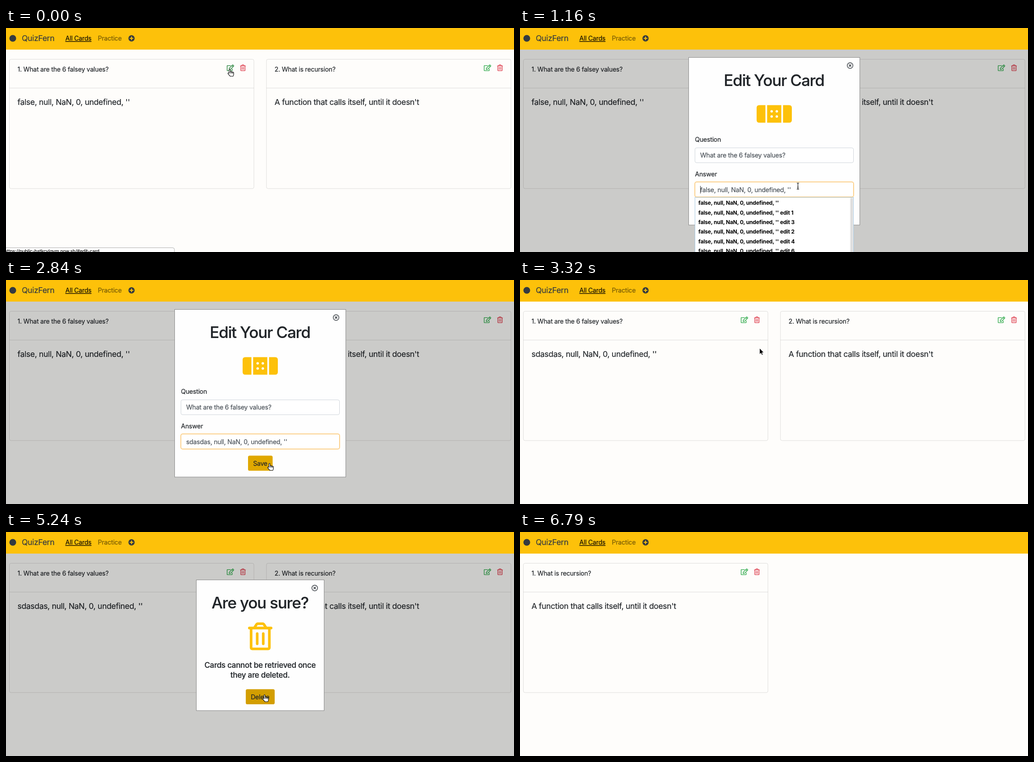
Animation, 1125 px wide and 498 px high, one loop 7080 ms. Source, as an HTML page:

```html
<!DOCTYPE html>
<html lang="en">
<head>
<meta charset="utf-8">
<title>Flash cards</title>
<style>
  html, body { margin: 0; width: 100%; height: 100%; overflow: hidden; background: #fefdfb; }
  svg { display: block; }
  text {
    font-family: Inter, "Open Sans", sans-serif;
    font-optical-sizing: none;
    letter-spacing: -.014em;
    color: #212529;
    fill: currentColor;
    stroke: currentColor;
    stroke-width: .2;
    white-space: pre;
  }
  .big { letter-spacing: -.018em; }
  .title { font-weight: 500; letter-spacing: -.0345em; }
  .note { font-weight: 500; letter-spacing: -.018em; }
  .bold { font-weight: 700; letter-spacing: -.013em; color: #000; stroke: none; }
  .mid { text-anchor: middle; }
  .line { fill: none; stroke: currentColor; }
</style>
</head>
<body>
<svg id="stage" width="1125" height="498" viewBox="0 0 1125 498"></svg>
<script>
const LOOP = 7080;
const GOLD = '#fdc10a', DARK = '#343a40';
const OLD = 'false', NEW = 'sdasdas', REST = ", null, NaN, 0, undefined, ''";
const RECURSION = ['What is recursion?', "A function that calls itself, until it doesn't"];

// Moments of the story, in ms
const EDIT = 180, FOCUS = 1100, TYPE = 1910, TYPED = 2600, SAVED = 2900, ASK = 4210, GONE = 5420;

// Pointer way points: time, x, y
const PATH = [
  [0, 495.5, 92], [450, 495.5, 92], [600, 520, 135], [800, 577, 262], [1000, 613, 345], [1050, 615.5, 351.5],
  [2630, 615.5, 351.5], [2720, 598, 385], [2810, 583.5, 408],
  [3110, 583.5, 408], [3215, 548, 262], [3320, 530.5, 152], [3420, 530, 108], [3530, 531.5, 88],
  [3860, 531.5, 88], [3940, 525, 91],
  [4410, 525, 91], [4560, 536, 160], [4720, 560, 296], [4880, 572.5, 362],
  [5690, 572.5, 362], [5780, 484, 345], [5860, 465, 295], [5940, 454, 228], [6020, 480, 227], [6080, 515, 234],
  [6350, 515, 234], [6405, 800, 345], [6460, 1092, 459],
  [6690, 1092, 459], [6730, 1116, 490], [6790, 1130, 500]
];

const text = (x, y, size, str, more = '') =>
  `<text x="${x}" y="${y}" font-size="${size}" ${more}>${str}</text>`;
const box = (x, y, w, h, fill, stroke = 'none', r = 3.6, more = '') =>
  `<rect x="${x}" y="${y}" width="${w}" height="${h}" rx="${r}" fill="${fill}" stroke="${stroke}" ${more}/>`;
const group = (id, body) => `<g id="${id}">${body}</g>`;
const at = (x, y, scale, color, id, body) =>
  `<g id="${id}" transform="translate(${x} ${y}) scale(${scale})" style="color:${color}">${body}</g>`;

const trash = (x, y, scale, color, id) => at(x, y, scale, color, id,
  `<path class="line" stroke-width="5.8" stroke-linecap="round" stroke-linejoin="round"
    d="M2.9 12.5H51.1M14.5 11L19 4.2Q20 2.9 21.5 2.9H32.5Q34 2.9 35 4.2L39.5 11
       M6.8 13V55.8Q6.8 58.8 9.8 58.8H44.2Q47.2 58.8 47.2 55.8V13M20.3 25V47.5M33.7 25V47.5"/>`);

const pencil = (x, y, id) => at(x, y, .0281, '#28a745', id,
  `<path class="line" stroke-width="48" stroke-linejoin="round"
    d="M318 88H48Q24 88 24 112V464Q24 488 48 488H400Q424 488 424 464V332
       M194 292L450 36Q467 20 483 36L541 94Q557 110 541 127L286 382L184 392ZM409 94L484 169"/>`);

const closer = (x, y) =>
  `<g transform="translate(${x} ${y})" style="color:${DARK}"><circle class="line" r="6.3" stroke-width="1.4"/>
   <path class="line" stroke-width="1.6" d="M-2.5-2.5L2.5 2.5M2.5-2.5L-2.5 2.5"/></g>`;

const card = (x, n) =>
  box(x + .5, 69.5, 541.5, 287.5, 'none', 'rgba(0,0,0,.125)') +
  `<path d="M${x + .5} 133.5H${x + 542}" stroke="rgba(0,0,0,.125)"/>` +
  text(x + 18.5, 96.7, 14, '', `id="q${n}"`) + text(x + 18.5, 171.3, 17.5, '', `id="a${n}" class="big"`) +
  pencil(x + 482, 81.2, 'edit' + n) + trash(x + 511.4, 81.2, .233, '#dc3545', 'trash' + n);

const bandage = () => {
  let s = `<path d="M543.5 171.5V210.5H530Q524 210.5 524 204.5V177.5Q524 171.5 530 171.5Z
                    M582.5 171.5H596Q602 171.5 602 177.5V204.5Q602 210.5 596 210.5H582.5Z" fill="${GOLD}"/>` +
    box(547.3, 171.5, 31.4, 39, GOLD, 'none', 0);
  for (const x of [557.3, 568.7]) for (const y of [185.3, 196.7])
    s += `<circle cx="${x}" cy="${y}" r="2.7" fill="#fff"/>`;
  return s;
};

const entries = ['', ' edit 1', ' edit 3', ' edit 2', ' edit 4', ' edit 6'];

document.getElementById('stage').innerHTML =
  box(0, 0, 1125, 498, '#fefdfb', 'none', 0) +
  card(7, 1) + group('second', card(576.3, 2)) +
  box(0, 48, 1125, 450, 'rgba(0,0,0,.2)', 'none', 0, 'id="shade"') +

  box(0, 0, 1125, 48, GOLD, 'none', 0) +
  `<circle cx="15" cy="23" r="7.5" fill="${DARK}"/>` +
  text(35, 29.3, 17.5, 'QuizFern', `class="big" style="color:${DARK}"`) +
  text(131.5, 28.3, 14, 'All Cards', 'style="color:rgba(0,0,0,.9)" text-decoration="underline"') +
  text(203.5, 28.3, 14, 'Practice', 'style="color:rgba(0,0,0,.5)"') +
  `<circle cx="278" cy="23" r="6.9" fill="${DARK}"/>
   <path d="M274 23H282M278 19V27" stroke="${GOLD}" stroke-width="2"/>` +

  group('editor',
    box(373.5, 65.5, 379, 372.5, '#fefefe', '#888', 0) + closer(731, 83.5) +
    text(562.5, 129.3, 35, 'Edit Your Card', 'class="title mid"') + bandage() +
    text(387.5, 253.4, 14, 'Question') + box(387.5, 266.5, 351, 33, '#fff', '#ced4da') +
    text(399, 288, 14, 'What are the 6 falsey values?', 'style="color:#495057"') +
    text(387.5, 330, 14, 'Answer') +
    box(386.8, 341.8, 352.4, 34.4, 'none', 'rgba(253,176,60,.3)', 4.4, 'id="glow" stroke-width="2"') +
    box(387.5, 342.5, 351, 33, '#fff', '#ced4da', 3.6, 'id="field"') +
    text(399, 364.5, 14, '', 'id="answer" style="color:#495057"') +
    box(399, 351, 1, 17, '#333', 'none', 0, 'id="caret"') +
    box(536, 390.5, 54.5, 33.5, GOLD, 'none', 3.6, 'id="save"') +
    text(563, 412.5, 14, 'Save', 'class="mid"') +
    group('list',
      box(387.5, 376.5, 351, 140, '#fff', '#a5c7e0', 0) +
      box(730.5, 377, 7.5, 130, '#f3f3f3', 'none', 0) + box(732, 378, 5, 130, '#dedede', 'none', 2) +
      entries.map((e, i) => text(395, 393.3 + i * 21.3, 12, OLD + REST + e, 'class="bold"')).join(''))) +

  group('confirm',
    box(421.5, 106.5, 283, 290.5, '#fefefe', '#888', 0) + closer(683.7, 124.5) +
    text(562.5, 170.3, 35, 'Are you sure?', 'class="title mid"') +
    trash(536, 201, 1, GOLD, 'bin') +
    text(562.7, 302.3, 17, 'Cards cannot be retrieved once', 'class="note mid"') +
    text(562.7, 323.5, 17, 'they are deleted.', 'class="note mid"') +
    box(531, 349.5, 64, 33.5, GOLD, 'none', 3.6, 'id="remove"') +
    text(562.8, 371.8, 14, 'Delete', 'class="mid"')) +

  group('status',
    `<path d="M-1 488.5H369Q373 488.5 373 492.5V500H-1Z" fill="#fdfdfd" stroke="#b0b0b0"/>` +
    text(-4, 499.7, 10.3, '', 'id="link" style="color:#111"')) +

  group('pointer',
    `<path id="arrow" d="M0 0V13.6L3.1 10.8L5.2 15.4L7.5 14.4L5.5 9.9H9.5Z" fill="#000" stroke="#fff" stroke-width=".9"/>
     <path id="hand" d="M-1.4 9V1.2A1.4 1.4 0 0 1 1.4 1.2V6A1.3 1.3 0 0 1 4 6.2A1.3 1.3 0 0 1 6.5 6.7A1.2 1.2 0 0 1 8.7 7.5V11
       Q8.7 13 7.4 15.2H.8Q-1.4 12.6-3.8 9.6A1.3 1.3 0 0 1-1.6 8.2ZM1.4 6V9M4 6.4V9M6.5 7V9.4" fill="#fff" stroke="#000" stroke-width="1.1"/>
     <path id="beam" class="line" style="color:#111" stroke-width="1.2"
       d="M-2.5-7Q0-7 0-5Q0-7 2.5-7M0-5V5M-2.5 7Q0 7 0 5Q0 7 2.5 7M-1.5 2.5H1.5"/>`);

const el = {};
document.querySelectorAll('[id]').forEach(e => el[e.id] = e);

const show = (id, on) => { el[id].style.display = on ? '' : 'none'; };
const set = (id, str) => { if (el[id].textContent !== str) el[id].textContent = str; };
const ramp = (t, a, b) => Math.min(1, Math.max(0, (t - a) / (b - a)));
const within = (t, a, b) => t >= a && t < b;

function pointerAt(t) {
  const i = PATH.findIndex(p => p[0] > t);
  if (i < 0) return PATH[PATH.length - 1].slice(1);
  const [a, x, y] = PATH[i - 1], [b, u, v] = PATH[i], k = (t - a) / (b - a);
  return [x + (u - x) * k, y + (v - y) * k];
}

function render(t) {
  const editing = within(t, EDIT, SAVED), asking = within(t, ASK, GONE), deleted = t >= GONE;

  // Cards
  set('q1', '1. ' + (deleted ? RECURSION[0] : 'What are the 6 falsey values?'));
  set('a1', deleted ? RECURSION[1] : (t < SAVED ? OLD : NEW) + REST);
  set('q2', '2. ' + RECURSION[0]);
  set('a2', RECURSION[1]);
  show('second', !deleted);
  el.edit1.style.color = t < 450 ? '#1e7e34' : '#28a745';
  el.trash1.style.color = within(t, 3880, 4440) ? '#b01e2e' : '#dc3545';
  show('shade', editing || asking);

  // Edit dialog
  show('editor', editing);
  const keys = t < TYPE ? 0 : Math.min(12, 1 + Math.floor((t - TYPE) / ((TYPED - TYPE) / 11)));
  const typed = NEW.slice(0, Math.max(0, keys - OLD.length));
  set('answer', (typed || OLD.slice(keys)) + REST);
  const focus = ramp(t, 1060, 1160);
  el.glow.style.opacity = focus;
  el.field.style.stroke = focus > .5 ? '#f8bd5a' : '#ced4da';
  show('list', within(t, FOCUS, TYPE));
  show('caret', within(t, FOCUS, 2630));
  if (editing) el.caret.setAttribute('x', 399 + (typed ? el.answer.getSubStringLength(0, typed.length) : 0));
  el.save.style.fill = within(t, 2750, SAVED) ? '#e0a800' : GOLD;

  // Delete dialog
  show('confirm', asking);
  el.remove.style.fill = t >= 5240 ? '#d39e00' : t >= 4840 ? '#e0a800' : GOLD;

  // Status bar
  set('link', `https://public-bstkcylqym.now.sh/#${t < 2000 ? 'edit' : 'delete'}-card`);
  el.status.style.opacity = t < 2000 ? 1 - ramp(t, 500, 750) : ramp(t, 3860, 4160) - ramp(t, 4500, 4750);

  // Pointer
  const [x, y] = pointerAt(t);
  const onField = editing && x < 739 && (within(y, 266, 300) || within(y, 342, 377));
  const shape = t < EDIT || within(t, 2750, SAVED) || within(t, 3880, ASK) || within(t, 4840, GONE) ? 'hand'
    : onField ? 'beam' : 'arrow';
  for (const s of ['arrow', 'hand', 'beam']) show(s, s === shape);
  show('pointer', !within(t, TYPE, 2630) && t < 6790);
  el.pointer.setAttribute('transform', `translate(${x} ${y})`);
}

const start = performance.now();
(function tick() {
  render((performance.now() - start) % LOOP);
  requestAnimationFrame(tick);
})();
</script>
</body>
</html>
```
